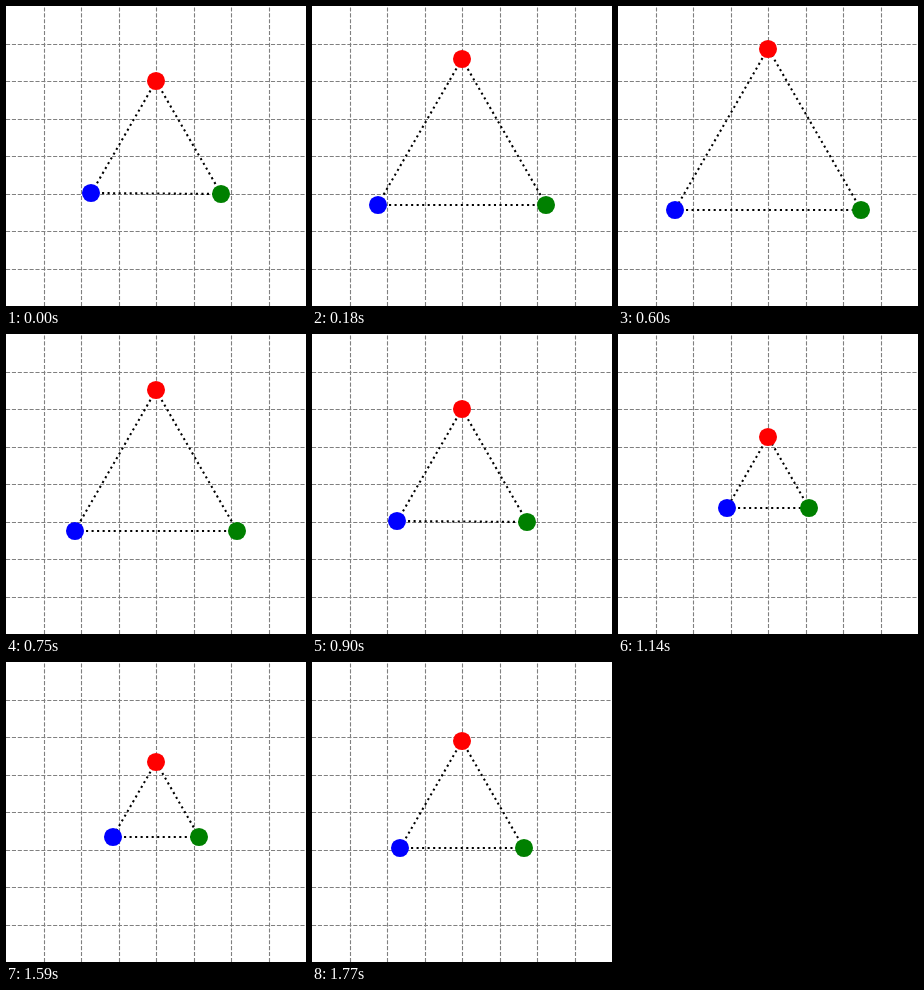
These frames come from a looping animation (300 by 300 pixels, 1.8 s). An HTML page with a canvas:

```html
<!DOCTYPE html>
<html lang="en">
<head>
<meta charset="utf-8">
<title>Pulsing triangle</title>
<style>
  html, body { margin: 0; width: 100%; height: 100%; overflow: hidden; background: #fff; }
  canvas { display: block; width: 300px; height: 300px; }
</style>
</head>
<body>
<canvas id="stage" width="300" height="300"></canvas>
<script>
const ctx = document.getElementById("stage").getContext("2d");
const SIZE = 300, CENTER = 150, UNIT = 75;
const LOOP = 1800, STEP = 30;
const PT = 100 / 72; // pixels per point
const COLORS = ["#f00", "#00f", "#008000"];

function line(x1, y1, x2, y2) {
  ctx.beginPath();
  ctx.moveTo(x1, y1);
  ctx.lineTo(x2, y2);
  ctx.stroke();
}

function setStroke(color, width, dash) {
  ctx.strokeStyle = color;
  ctx.lineWidth = width;
  ctx.setLineDash(dash.map(d => d * width));
}

function drawGrid() {
  setStroke("#808080", 0.8 * PT, [3.7, 1.6]);
  for (let i = 1; i < 8; i++) {
    const p = Math.round(i * UNIT / 2) + 0.5;
    line(p, SIZE, p, 0);
    line(0, p, SIZE, p);
  }
}

function drawTriangle(phase) {
  const r = UNIT * (1 + 0.5 * Math.sin(2 * Math.PI * phase));
  const dx = r * Math.sqrt(3) / 2;
  const baseY = CENTER + r / 2;
  const red = [CENTER, CENTER - r];
  // The base sits on whole pixels; a half-pixel tie splits between its ends.
  const blue = [CENTER - dx, baseY - 1e-6];
  const green = [CENTER + dx, baseY + 1e-6];
  const snap = p => p.map(Math.round);

  setStroke("#000", 1.5 * PT, [1, 1.65]);
  line(...red, ...blue);
  line(...snap(blue), ...snap(green));
  line(...green, ...red);

  [red, blue, green].forEach((p, i) => {
    ctx.fillStyle = COLORS[i];
    ctx.beginPath();
    ctx.arc(...snap(p), 6.5 * PT, 0, 2 * Math.PI);
    ctx.fill();
  });
}

function draw() {
  const time = (performance.now() + 0.1) % LOOP;
  ctx.fillStyle = "#fff";
  ctx.fillRect(0, 0, SIZE, SIZE);
  drawGrid();
  drawTriangle(Math.floor(time / STEP) * STEP / LOOP);
  requestAnimationFrame(draw);
}

draw();
</script>
</body>
</html>
```
